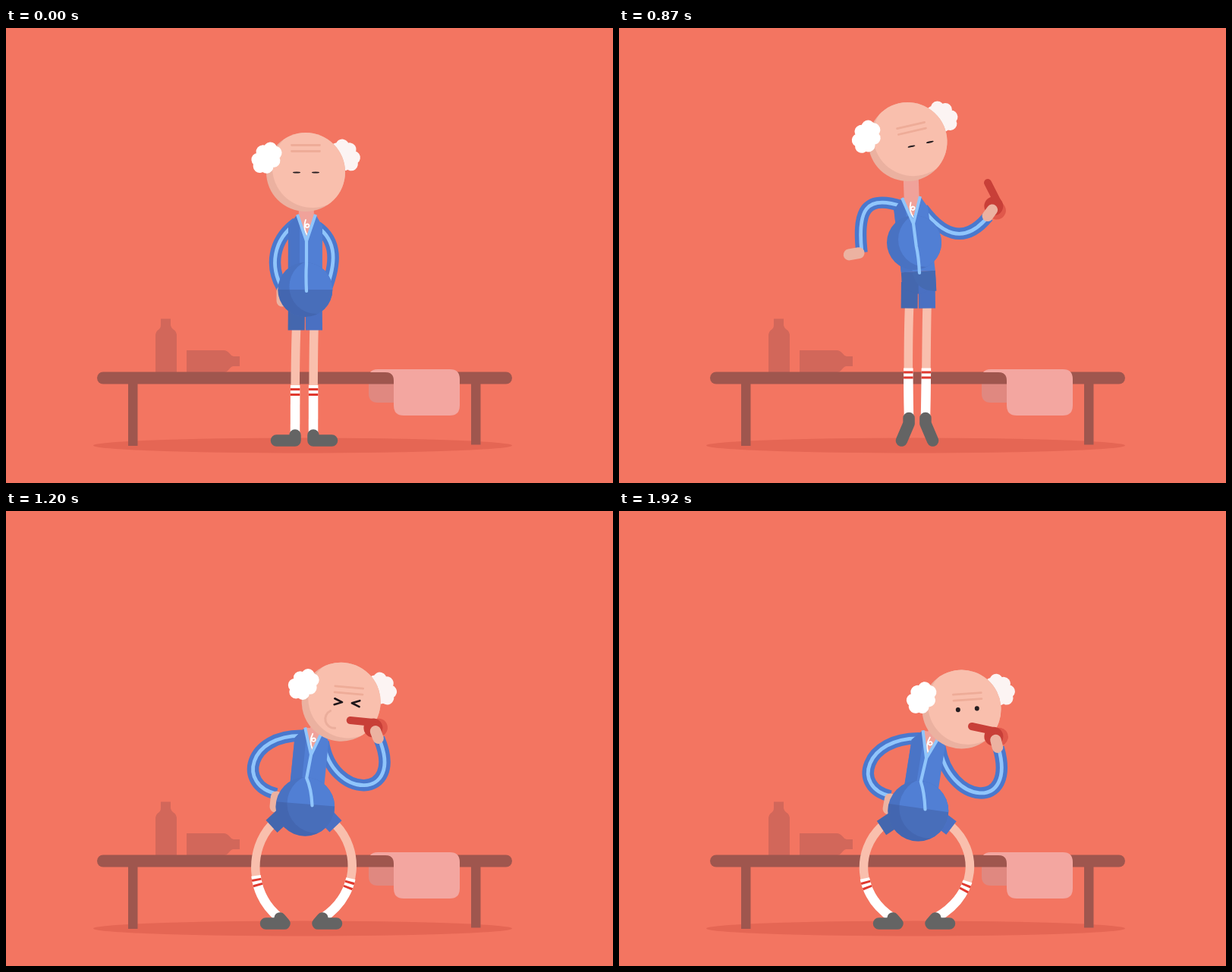
An HTML page for the animation above (1950 ms loop, 800 by 600 pixels).

```html
<!DOCTYPE html>
<html lang="en">
<head>
<meta charset="utf-8">
<title>Coach with a whistle</title>
<style>
  html, body { margin: 0; width: 100%; height: 100%; overflow: hidden; background: #f37561; }
  svg { display: block; width: 100vw; height: 100vh; }
</style>
</head>
<body>
<svg viewBox="0 0 800 600">
  <defs>
    <clipPath id="headClip"><circle r="52"/></clipPath>
    <clipPath id="bellyClip"><circle id="bellyShape" r="36"/></clipPath>
  </defs>
  <rect width="800" height="600" fill="#f37561"/>
  <ellipse cx="391" cy="550.5" rx="276" ry="10" fill="#e56654"/>
  <g fill="#d2675a">
    <path d="M204 383.500H217V392Q218 396 222 398.500Q225 401 225 406V454H197V406Q197 401 200 398.500Q204 396 204 392Z"/>
    <path d="M238 425H287Q291 425 294 428.500Q297 432.500 300 433H308V446H300Q297 446 294 450Q291 454 287 454H238Z"/>
  </g>
  <path d="M478 460V482Q478 494 490 494H515V460Z" fill="#e08880"/>
  <g fill="#9f564e">
    <rect x="161" y="465" width="12.500" height="86"/>
    <rect x="613" y="465" width="12.500" height="84.500"/>
    <rect x="120" y="453.500" width="547" height="16" rx="8"/>
  </g>
  <path d="M480 454Q483 450 490 450H585Q598 450 598 463V498Q598 511 585 511H524Q511 511 511 498V465Q511 454 500 454Z" fill="#f3a6a0"/>
  <g id="coach" fill="none" stroke-linejoin="round"></g>
</svg>
<script>
const LOOP = 1950, STEP = 30;
const SKIN = '#f9bfad', HAND = '#ecb2a1', SLEEVE = '#4a78cd', TRIM = '#90c5fb';

const clamp = u => Math.max(0, Math.min(1, u));
const mix = (a, b, u) => a + (b - a) * u;
const smooth = u => u * u * (3 - 2 * u);
const easeIn = u => u * u;
const easeOut = u => 1 - (1 - u) ** 3;
const sineOut = u => Math.sin(u * Math.PI / 2);
const during = (t, from, to) => smooth(clamp((t - from) / (to - from)));

// head, chest, hand, whistle: x y | waist: height, belly lift | feet: centre, toe spread, pitch
// turn: head, chest, whistle, left hand | bends: offsets of the curve handles of an arm
const stand = {
  head: [395, 190], chest: [396, 281], waist: [345, 0], feet: [393, 36.5, 0],
  hand: [364, 343], whistle: [421, 301], turn: [0, 0, 63, 90],
  bendL: [-32, 23, -16, -28], bendR: [27, 19, -25, -28]
};
const lowered = (pose, d) => ({
  ...pose,
  ...Object.fromEntries(['head', 'chest', 'hand', 'whistle'].map(k => [k, [pose[k][0], pose[k][1] + d]])),
  waist: [pose.waist[0] + d, 0]
});
const stretch = {
  head: [380.5, 150], chest: [388, 258], waist: [321, 38], feet: [393, 20.5, 67],
  hand: [320, 296], whistle: [486, 204], turn: [-13, -5, 63, 170],
  bendL: [-48, -16, -6, -56], bendR: [23, 31, 21, 48]
};
const land = {
  head: [422, 232], chest: [396, 313], waist: [376, 0], feet: [389, 46.5, 0],
  hand: [354, 367], whistle: [431, 260], turn: [13, 2, 0, 92],
  bendL: [-73, -2, -52, -11], bendR: [12, 77, 42, 78]
};
const settle = {
  ...land,
  head: [451.5, 261.5], chest: [405, 326], waist: [391.5, 0],
  hand: [358, 376], whistle: [465, 284], turn: [-4, 12, 12, 100]
};
const moves = [
  { from: 540, to: 660, a: stand, b: lowered(stand, 7), ease: smooth },
  { from: 660, to: 870, a: lowered(stand, 7), b: stretch, ease: smooth },
  { from: 870, to: 1080, a: stretch, b: land, ease: easeIn },
  { from: 1080, to: 1470, a: land, b: settle, ease: easeOut }
];

// Angles follow their own softer ease
function poseAt(t) {
  const { from, to, a, b, ease } = moves.find(m => t < m.to) || moves[moves.length - 1];
  const u = clamp((t - from) / (to - from)), pose = {};
  for (const part in a) {
    const k = (part === 'turn' ? sineOut : ease)(u);
    pose[part] = a[part].map((v, i) => mix(v, b[part][i], k));
  }
  pose.squat = Math.max(0, (pose.waist[0] - 345) / 46.5);
  return pose;
}

const rotate = (x, y, deg, [ox, oy] = [0, 0]) => {
  const a = deg * Math.PI / 180, c = Math.cos(a), s = Math.sin(a);
  return [ox + x * c - y * s, oy + x * s + y * c];
};
const path = (d, color, width, extra = '') =>
  `<path d="${d}" stroke="${color}" stroke-width="${width}" ${extra}/>`;
const poly = (points, color) => `<path d="M${points.join('L')}Z" fill="${color}"/>`;
const disc = (x, y, r, color) => `<circle cx="${x}" cy="${y}" r="${r}" fill="${color}"/>`;
const group = ([x, y], deg, content) =>
  `<g transform="translate(${x} ${y}) rotate(${deg})">${content}</g>`;
const ROUND = 'stroke-linecap="round"';

// A ring of puffs on a slanted ellipse
function hair(x, y, slant, color) {
  let tuft = disc(0, 0, 13, color);
  for (let i = 0; i < 7; i++) {
    const a = i * Math.PI * 2 / 7;
    tuft += disc(14 * Math.cos(a), 9.5 * Math.sin(a), 8.8, color);
  }
  return group([x, y], slant, tuft);
}

// Centre and spread of both short legs, and their lower edge
const hem = ({ squat, waist }) => ({
  x: 394.3 - 2.3 * squat,
  spread: 11.7 + 34.3 * squat,
  y: 398.5 + 19.5 * squat + 1.2 * Math.min(0, waist[0] - 345)
});

function leg(side, p) {
  const { x, spread, y } = hem(p), [centre, toe, pitch] = p.feet;
  const toePoint = [centre + side * toe, 544];
  const [back, rise] = rotate(24.5, 0, pitch);
  const heel = [toePoint[0] - side * back, 544 - rise];
  const ankle = [heel[0] + side * Math.max(0, toe - 36.5) * .6, heel[1] - 7];
  const height = ankle[1] - y, knee = 393 + side * (12 + 68.5 * p.squat);
  const d = `M${ankle}C${knee} ${ankle[1] - height * .27} ${knee} ${y + height * .25} ${x + side * spread} ${y - 2}`;
  const dash = list => `stroke-dasharray="${list}"`;
  return path(d, SKIN, 11.5)
    + path(d, '#fff', 12.5, dash('66 999'))
    + path(d, '#e0392f', 12.5, dash('0 52 3 4 3 999'))
    + path(`M${ankle}L${heel}L${toePoint}`, '#646464', 15.5, ROUND);
}

function shorts(p) {
  const { x, spread, y } = hem(p), waist = [394.3, p.waist[0]];
  const at = (dx, dy) => rotate(dx, dy, p.turn[1] * .67, waist);
  const half = (side, color) => {
    const end = x + side * spread, top = (waist[0] + side * 11 + end) / 2;
    return path(`M${top} ${waist[1] + 14}L${end} ${y}`, color, 22)
      + poly([at(side * 22.5, 0), at(0, 0), at(0, 30), at(side * 22.5, 22)], color);
  };
  return half(-1, '#4467ae') + half(1, '#4a70c2')
    + `<path d="M${at(-8, 0)}Q${at(-4, 27)} ${at(22.5, 27)}L${at(22.5, 0)}Z" fill="#456ab1"/>`;
}

function torso({ chest, waist: [wy, lift], turn, squat, head }) {
  const [cx, cy] = chest, waist = [394.3, wy], tilt = turn[1] * .67;
  const up = (x, y) => rotate(x, y, turn[1], chest), low = x => rotate(x, 0, tilt, waist);
  const left = up(-12, -35), right = up(12, -35), sleeve = up(-24, -20);
  const neckEnd = [mix(head[0], cx, .4), head[1] + 10];
  const bx = 394.3 - lift * .14, by = wy + 4 * squat - lift, r = 36 + 4 * squat ** 3;
  const slack = clamp(squat * 1.4);
  const mid = [mix(cx, 396, .47) - 3 * slack, mix(cy, wy, .47)];
  const end = [396 + 7.5 * slack, wy + 2];
  for (const [k, v] of Object.entries({ cx: bx, cy: by, r })) bellyShape.setAttribute(k, v);
  return path(`M${up(0, -22)}L${neckEnd}`, '#f0a29a', 20)
    + poly([left, right, chest], '#f0a29a')
    + poly([sleeve, left, chest, right, up(21, -20), low(22.5), low(-22.5)], '#517fd4')
    + poly([sleeve, left, up(-9, -26), low(-7.5), low(-22.5)], '#4a74c6')
    + `<g clip-path="url(#bellyClip)">${disc(bx, by, r + 1, '#4972c2')}${disc(bx + 15, by - 4, r, '#517fd4')}`
    + group(waist, tilt, '<rect x="-60" width="120" height="90" fill="#3c5796" opacity=".42"/>') + '</g>'
    + group(chest, turn[1], path('M-1 -28Q-5 -17 1 -8M-2 -19C0 -25 5 -22 3 -19Q1 -17 -1 -19', '#fff', 1.8, ROUND))
    + path(`M${left}L${chest}L${right}`, TRIM, 4)
    + path(`M${chest}L${mid}Q${end[0] - 1} ${mid[1] + 14} ${end}`, TRIM, 4.2, ROUND);
}

function face(t) {
  const back = during(t, 900, 1080);
  const ex = .5 + 15.5 * during(t, 210, 330) - 8.2 * back;
  const ey = .5 + 6.5 * during(t, 30, 330) - 6.7 * back;
  const blowing = t >= 1020 && t < 1740;
  if (!blowing) {
    const open = during(t, 0, 90) - during(t, 540, 630) + .4 * during(t, 1740, 1830);
    const rx = 5 - 2 * during(t, 1640, 1740), ry = 1.1 + 4.9 * open;
    return [-12.5, 12.5].map(dx =>
      `<ellipse cx="${ex + dx}" cy="${ey}" rx="${rx}" ry="${ry}" fill="#251d20"/>`).join('');
  }
  const squint = side => path(`M${ex + side * 16.5} ${ey - 4}l${-side * 10} 4l${side * 10} 4`, '#1c1519', 2.6, ROUND);
  const puff = 9 + 3 * clamp(1 - Math.abs(t - 1200) / 150);
  return squint(-1) + squint(1)
    + path(`M-13 ${25 - puff}A${puff} ${puff} 0 0 0 -5 ${25 + puff * .85}`, '#ebae9c', 3, ROUND);
}

function head(p, t) {
  const nod = during(t, 540, 870);
  const wrinkles = path(`M${8.8 * nod - 18.5} ${15.5 * nod - 35.5}h37m-37 8h37`, '#eeac98', 2.8, ROUND);
  return group(p.head, p.turn[0], hair(52, -22, 55, '#fcf4f3')
    + `<g clip-path="url(#headClip)">${disc(0, 0, 53, '#ebb1a0')}${disc(9, -6, 53, SKIN)}</g>`
    + wrinkles + face(t) + hair(-51.5, -18.5, 130, '#fff'));
}

const arm = (shoulder, [dx, dy], reach, wrist) => {
  const d = `M${shoulder}C${shoulder[0] + dx} ${shoulder[1] + dy} ${wrist[0] + reach[0]} ${wrist[1] + reach[1]} ${wrist}`;
  return path(d, SLEEVE, 15.5) + path(d, TRIM, 4.8);
};

function leftArm({ chest, turn, hand, bendL }) {
  return arm(rotate(-13, -24, turn[1], chest), bendL, bendL.slice(2), hand)
    + path(`M${rotate(4, 0, turn[3], hand)}L${rotate(17, 0, turn[3], hand)}`, HAND, 15, ROUND);
}

// The forearm turns with the whistle
function rightArm({ chest, turn, whistle, bendR }) {
  return arm(rotate(14, -19, turn[1], chest), bendR,
    rotate(bendR[2], bendR[3], turn[2]), rotate(40, 20, turn[2], whistle));
}

const whistle = ({ whistle: at, turn }) => group(at, turn[2],
  disc(38, 6, 12, '#e0584b') + disc(31, 7, 12.5, '#c83f38')
  + path('M0 0H28', '#c83f38', 10, ROUND) + path('M34.500 11L39 20', HAND, 14.5, ROUND));

function scene(t) {
  const p = poseAt(t);
  return leg(-1, p) + leg(1, p) + leftArm(p) + rightArm(p)
    + shorts(p) + torso(p) + head(p, t) + (t >= 690 ? whistle(p) : '');
}

const coach = document.getElementById('coach');
const bellyShape = document.getElementById('bellyShape');
const start = performance.now();
function frame() {
  const t = (performance.now() - start) % LOOP;
  coach.innerHTML = scene(Math.floor(t / STEP) * STEP);
  requestAnimationFrame(frame);
}
frame();
</script>
</body>
</html>
```
